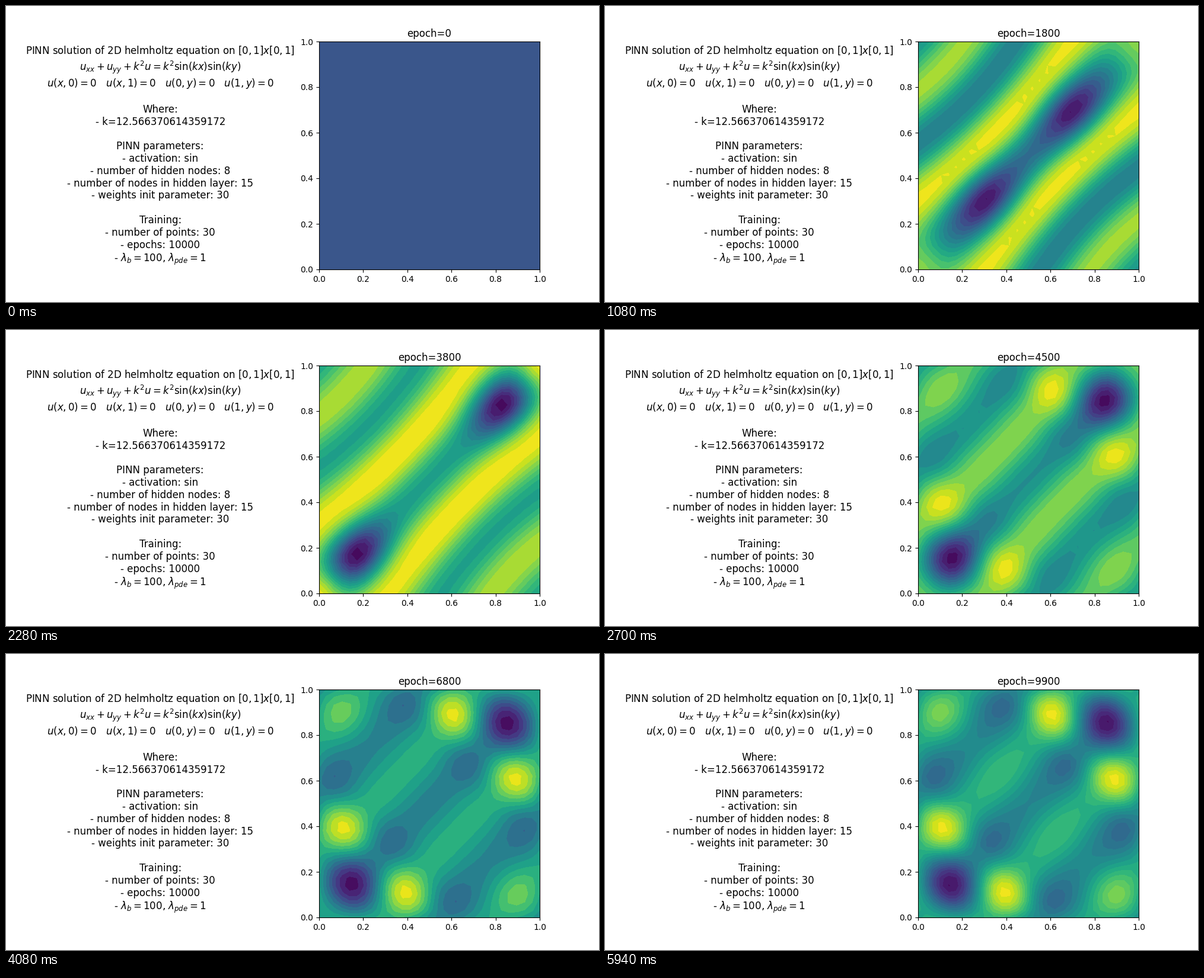
A matplotlib script for the animation above (6000 ms loop, 1000 by 500 pixels).

```python
import numpy as np
import matplotlib.pyplot as plt
from matplotlib.animation import FuncAnimation

FRAMES = 100
INTERVAL = 60
EPOCHS_PER_FRAME = 100
K = 4 * np.pi

INFO = "\n".join([
    r"PINN solution of 2D helmholtz equation on $[0,1]x[0,1]$",
    r"$u_{xx} + u_{yy} + k^2 u = k^2 \sin(kx)\sin(ky)$",
    r"$u(x,0)=0 \quad u(x,1)=0 \quad u(0,y)=0 \quad u(1,y)=0$",
    "",
    "Where:",
    f"- k={K}",
    "",
    "PINN parameters:",
    "- activation: sin",
    "- number of hidden nodes: 8",
    "- number of nodes in hidden layer: 15",
    "- weights init parameter: 30",
    "",
    "Training:",
    "- number of points: 30",
    "- epochs: 10000",
    r"- $\lambda_b=100$, $\lambda_{pde}=1$",
])

axis = np.linspace(0, 1, 30)
X, Y = np.meshgrid(axis, axis)

# Diagonal coordinates: D runs across the stripes, S along them.
D = X - Y
S = X + Y - 1
WAVE = np.cos(K * D / (1.04 + 0.4 * S ** 2))
CHECKER = (np.cos(1.05 * K * S) - WAVE) / 2
CENTRE = np.exp(-(S / 0.4) ** 4 - (D / 0.9) ** 4)


def smoothstep(t, start, end):
    p = np.clip((t - start) / (end - start), 0, 1)
    return p * p * (3 - 2 * p)


def settle(age, tau):
    return 1 - np.exp(-age / tau)


def pair(s0, width_d, width_s):
    """Two soft spots on the main diagonal, at s = s0 and s = -s0."""
    along = sum(np.exp(-((S - c) / width_s) ** 2) for c in (s0, -s0))
    return np.exp(-(D / width_d) ** 2) * along


def solution(frame):
    age = max(frame - 9, 0)
    cells = smoothstep(frame, 38, 54)

    # Diagonal stripes weaken and rise while two lobes move to the corners.
    offset = 0.33 * settle(age, 8) * (1 - cells)
    stripes = (offset - (0.75 - 0.55 * settle(age, 22)) * WAVE)
    stripes *= np.exp(-0.6 * D ** 2)
    lobes = (0.1 + 0.85 * settle(age, 8)) * pair(
        0.75 * settle(age, 12), 0.17, 0.24)
    corners = (0.8 - 0.4 * cells) * pair(1, 0.16, 0.22)

    # Then the checkerboard of the exact solution grows in from the edges.
    inner = 1 - 0.1 * smoothstep(frame, 82, 99)
    checker = 0.85 * cells * (1 - inner * CENTRE) * CHECKER
    return stripes - (1 - 0.85 * cells) * lobes + corners + checker


fig = plt.figure(figsize=(10, 5), dpi=100)
fig.text(0.26025, 0.495, INFO, fontsize=12, ha="center", va="center")
ax = fig.add_axes([0.528, 0.11, 0.372, 0.77])
ax.set(xlim=(0, 1), ylim=(0, 1), facecolor="#3a568b")


def reset():
    for contours in list(ax.collections):
        contours.remove()
    return []


def update(frame):
    reset()
    # The untrained network is flat: only the plain backdrop shows.
    if frame > 0:
        ax.contourf(X, Y, solution(frame), 20, cmap="viridis")
    ax.set_title(f"epoch={frame * EPOCHS_PER_FRAME}")
    return []


anim = FuncAnimation(fig, update, frames=FRAMES, init_func=reset,
                     interval=INTERVAL, repeat=True, repeat_delay=0)
plt.show()
```
